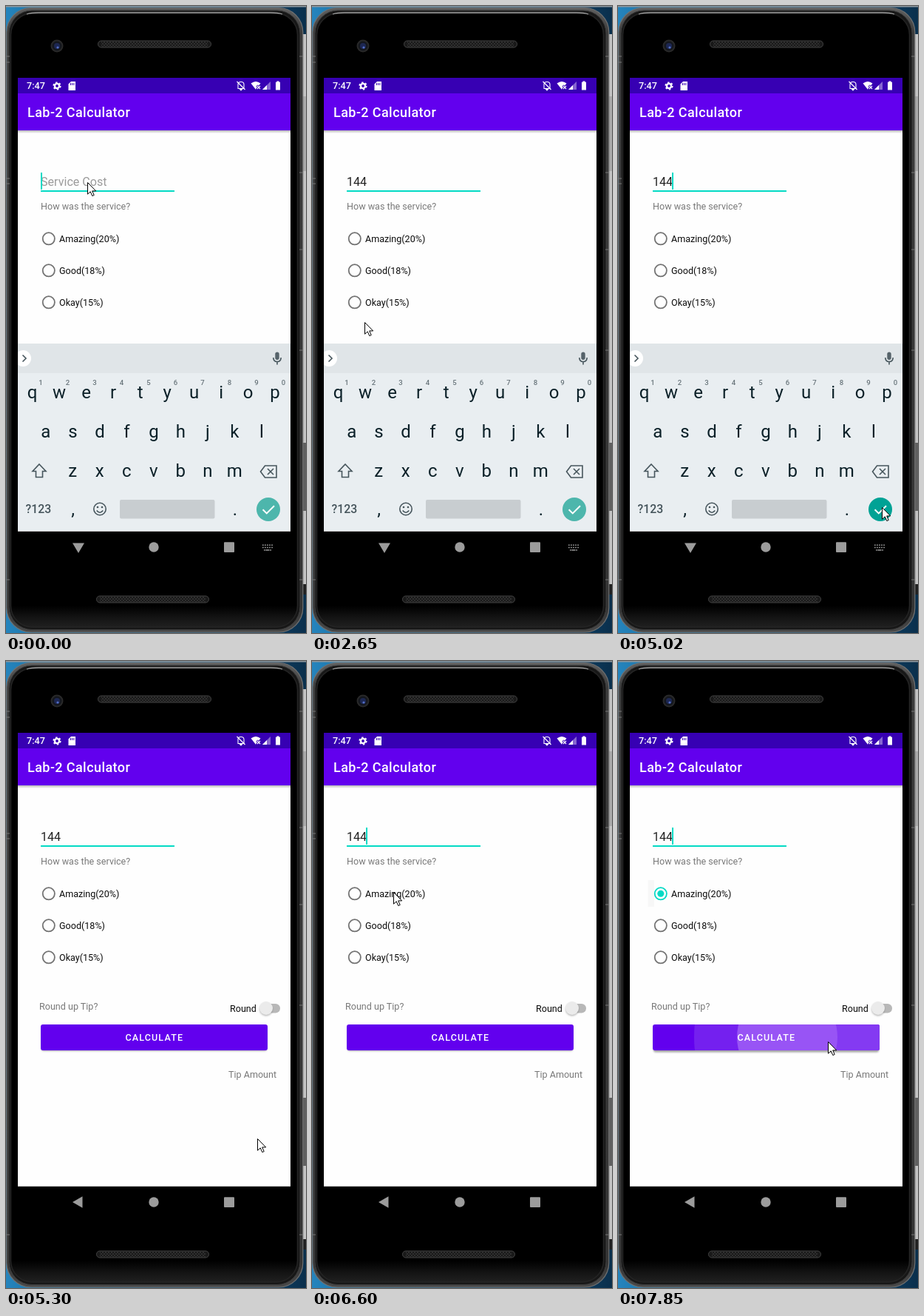
Recreate the animation shown at these times as an HTML page. Size 406 px wide and 847 px high, loop 8 s.

```html
<!DOCTYPE html>
<html lang="en">
<head>
<meta charset="utf-8">
<title>Tip calculator</title>
<style>
html, body { margin: 0; width: 100%; height: 100%; overflow: hidden; background: #000; }
svg { display: block; width: 406px; height: 847px; font-family: Roboto, sans-serif; }
.label { font-size: 12.57px; fill: #0c0c0c; }
.muted { fill: #797979; }
.key { font-size: 24px; fill: #0b2028; text-anchor: middle; }
.num { font-size: 9.6px; fill: #69757b; text-anchor: middle; font-weight: 500; }
.line { fill: none; stroke: #46555c; stroke-width: 1.6; }
</style>
</head>
<body>
<svg id="stage" viewBox="0 0 406 847">
  <defs>
    <linearGradient id="sky">
      <stop offset="0" stop-color="#2584bd"/><stop offset=".1" stop-color="#1d76ab"/>
      <stop offset=".9" stop-color="#0d3c5f"/><stop offset="1" stop-color="#0a2f4c"/>
    </linearGradient>
    <linearGradient id="metal" x2="0" y2="1">
      <stop offset="0" stop-color="#606060"/><stop offset=".04" stop-color="#3c3c3c"/>
      <stop offset=".96" stop-color="#343434"/><stop offset="1" stop-color="#4a4a4a"/>
    </linearGradient>
    <linearGradient id="face" x2="0" y2="1">
      <stop offset=".965" stop-color="#000"/><stop offset=".985" stop-color="#141414"/><stop offset="1" stop-color="#202020"/>
    </linearGradient>
    <linearGradient id="fade" x2="0" y2="1">
      <stop offset="0" stop-color="#000" stop-opacity=".28"/><stop offset="1" stop-color="#000" stop-opacity="0"/>
    </linearGradient>
    <pattern id="mesh" width="4" height="4" patternUnits="userSpaceOnUse">
      <path d="M0 1H2M2 3H4" stroke="#454545"/>
    </pattern>
    <filter id="soft" x="-20%" y="-40%" width="140%" height="200%"><feGaussianBlur stdDeviation="1.3"/></filter>
    <clipPath id="buttonClip"><rect x="47" y="491" width="307" height="35" rx="3"/></clipPath>
    <clipPath id="screenClip"><rect x="16" y="97" width="369" height="613"/></clipPath>
  </defs>

  <!-- desktop and phone body -->
  <rect width="406" height="847" fill="url(#sky)"/>
  <rect width="406" height="1.5" fill="#8d969c"/>
  <rect x="401" y="38" width="5" height="743" fill="#c4c4c4"/>
  <path d="M401 122H406V223H401Z" fill="#aaa"/>
  <path d="M401 590H406V682H401Z" fill="#606060"/>
  <path d="M401 781H406V795H401Z" fill="#202020"/>
  <rect x=".8" y="2.5" width="401" height="843.5" rx="33" fill="url(#metal)" stroke="#717171" stroke-width="1.2"/>
  <rect x="4" y="6" width="394" height="836.5" rx="31" fill="#171717" stroke="#3d3d3d"/>
  <rect x="6.5" y="10" width="388" height="829" rx="29" fill="url(#face)" stroke="#242424" stroke-width="1.5"/>
  <path d="M28 11Q34 9 44 9H358Q368 9 374 11" fill="none" stroke="#9b9b9b" stroke-width="1.3"/>
  <path d="M0 68H5M0 76H5M0 233H5M0 240H5M397 68H402M397 225H402M397 329H402M397 465H402M0 775H5M397 775H402" stroke="#777"/>
  <g stroke="#444"><rect x="124.5" y="47" width="153" height="9" rx="4.5" fill="#191919"/><rect x="122.5" y="797" width="152" height="9" rx="4.5" fill="#191919"/></g>
  <path d="M129 48H273V55H129ZM127 798H270V805H127Z" fill="url(#mesh)"/>
  <circle cx="69" cy="54" r="7.5" fill="#14171d" stroke="#292929" stroke-width="2"/>
  <circle cx="69" cy="54" r="4" fill="#1d2752"/><circle cx="70" cy="56" r="1.6" fill="#536fc7"/>

  <!-- application -->
  <g clip-path="url(#screenClip)">
    <rect x="16" y="97" width="369" height="613" fill="#fefefe"/>
    <rect x="16" y="168" width="369" height="4" fill="url(#fade)"/>
    <rect x="16" y="118" width="369" height="50" fill="#6200ee"/>
    <rect x="16" y="97" width="369" height="21" fill="#3700b3"/>
    <text x="28" y="112" font-size="12.6" font-weight="500" fill="#fff">7:47</text>
    <text x="29" y="150" font-size="18" font-weight="500" letter-spacing=".42" fill="#fff">Lab-2 Calculator</text>
    <g fill="#fff">
      <circle cx="69" cy="108" r="3.1" fill="none" stroke="#fff" stroke-width="2.4"/>
      <circle cx="69" cy="108" r="4.7" fill="none" stroke="#fff" stroke-width="1.8" stroke-dasharray="2.4 2.52"/>
      <path d="M88 102H94V114H84.5V105.5Z"/>
      <path d="M87.5 104V107M89.7 104V107M91.9 104V107" stroke="#3700b3" stroke-width="1"/>
      <path d="M314 111.5V106Q314 102.5 318 102.5T322 106V111.5ZM316.7 112.5H319.3L318 114Z" fill="none" stroke="#fff" stroke-width="1.1"/>
      <path d="M312.5 102L323.5 113" stroke="#fff" stroke-width="1.3"/>
      <path d="M331.5 104.5Q338 99.5 344.5 104.5L338 112.8Z"/>
      <path d="M339.5 107.5L344.5 112.5M344.5 107.5L339.5 112.5" stroke="#3700b3" stroke-width="3"/>
      <path d="M340 108L344 112M344 108L340 112" stroke="#fff" stroke-width="1.2"/>
      <path d="M358 102V113H347Z" fill-opacity=".4"/><path d="M353 107V113H347Z"/>
      <path d="M366.5 101.5H369.5V102.8H371V113.5H365V102.8H366.5Z"/>
    </g>

    <text id="hint" x="47" y="243" font-size="16.1" fill="#9b9b9b">Service Cost</text>
    <text id="cost" x="47" y="243" font-size="16.1" fill="#202020"></text>
    <rect x="47" y="249" width="181" height="2" fill="#03dac5"/>
    <rect id="caret" y="225" width="2" height="23" fill="#03dac5"/>
    <text class="label muted" x="47" y="274.5">How was the service?</text>
    <g id="radios"></g>

    <text class="label muted" x="45" y="470.5">Round up Tip?</text>
    <text class="label" x="303" y="474">Round</text>
    <rect x="346" y="463" width="25" height="12.5" rx="6.25" fill="#b8b8b8"/>
    <circle cx="352" cy="470.5" r="9" fill="#777" opacity=".5" filter="url(#soft)"/>
    <circle cx="352" cy="469" r="9" fill="#ebebeb"/>
    <rect id="shade" x="48" width="305" height="34" rx="3" fill="#666" filter="url(#soft)"/>
    <g clip-path="url(#buttonClip)">
      <rect x="47" y="490" width="307" height="37" fill="#6200ee"/>
      <circle id="outer" cx="284" cy="508" r="181" fill="#7420ef"/>
      <rect id="tail" x="229" y="490" width="126" height="37" fill="#843af2"/>
      <circle id="inner" cy="508" fill="#9854f5"/>
    </g>
    <text x="161.4" y="513" font-size="12.57" font-weight="500" letter-spacing="1.12" fill="#fff">CALCULATE</text>
    <text class="label muted" x="301" y="563">Tip Amount</text>

    <g id="keyboard">
      <rect x="16" y="456" width="369" height="254" fill="#e9eef1"/>
      <rect x="16" y="456" width="369" height="40" fill="#e0e5e8"/>
      <circle cx="23" cy="476" r="11" fill="#fff"/>
      <path class="line" d="M22.5 471.5L27 476L22.5 480.5" stroke-width="1.8"/>
      <rect x="364.3" y="467.5" width="5.4" height="10.5" rx="2.7" fill="#56636a"/>
      <path class="line" d="M361.8 475Q362 480.5 367 480.5T372.2 475M367 480.5V484.5"/>
      <g id="keys"></g>
      <path class="line" d="M45 619L54 628.5H49.5V636.5H40.5V628.5H36Z"/>
      <path class="line" d="M344.5 629L350.5 621H366V637H350.5ZM354 625L362 633M362 625L354 633"/>
      <text x="26.5" y="685" font-size="15.8" font-weight="500" fill="#46555c">?123</text>
      <circle class="line" cx="127" cy="679.5" r="8.2"/>
      <path class="line" d="M122.7 681.5Q127 687 131.3 681.5"/>
      <circle cx="124" cy="677" r="1.3" fill="#46555c"/><circle cx="130" cy="677" r="1.3" fill="#46555c"/>
      <rect x="154" y="667" width="128.5" height="25.5" rx="2" fill="#c8cdd0"/>
      <circle id="done" cx="355" cy="680" r="16"/>
      <path d="M347.6 680.2L352.8 685.4L363 675.2" fill="none" stroke="#fff" stroke-width="2"/>
    </g>
    <rect x="16" y="709" width="369" height="1" fill="#c4c4c4"/>
  </g>

  <!-- navigation -->
  <g fill="#9c9c9c">
    <path id="back"/>
    <circle cx="200" cy="731" r="6.7"/><rect x="295" y="724.3" width="14" height="13.7" rx="1"/>
    <g id="ime" fill="none" stroke="#9c9c9c" stroke-width="1.6">
      <path d="M347 728.3H361M347 731.5H361" stroke-dasharray="1.7 1.35"/>
      <path d="M349 735H359" stroke-dasharray="1.7 .6 5.2 .8"/>
    </g>
  </g>
  <path id="mouse" d="M.5 .5V16.2L4.2 12.8L6.8 18.6L9.2 17.5L6.7 11.9H11.7Z" fill="#fff" stroke="#000"/>
</svg>
<script>
const $ = id => document.getElementById(id);
const LOOP = 8000;

function add(parent, tag, attrs, text = '') {
  const el = document.createElementNS('http://www.w3.org/2000/svg', tag);
  for (const name in attrs) el.setAttribute(name, attrs[name]);
  el.textContent = text;
  return parent.appendChild(el);
}

function set(id, attrs) {
  for (const name in attrs) $(id).setAttribute(name, attrs[name]);
}

const show = (id, on) => set(id, { visibility: on ? 'visible' : 'hidden' });

// Keyboard letters
[['qwertyuiop', 35.6, 530], ['asdfghjkl', 53.9, 583], ['zxcvbnm', 90.3, 636]].forEach(([row, x, y], r) => {
  [...row].forEach((ch, i) => {
    const cx = x + i * 36.5;
    add($('keys'), 'text', { class: 'key', x: cx, y }, ch);
    if (!r) add($('keys'), 'text', { class: 'num', x: cx + 11.3, y: 512 }, (i + 1) % 10);
  });
});
add($('keys'), 'text', { class: 'key', x: 90.5, y: 688 }, ',');
add($('keys'), 'text', { class: 'key', x: 310, y: 688 }, '.');

// Radio group
const radios = $('radios');
add(radios, 'circle', { id: 'halo', cx: 58, cy: 314, r: 17, fill: '#e6e6e6' });
add(radios, 'rect', { id: 'trace', x: 40.5, y: 296, width: 8.5, height: 36, fill: '#f7f7f7' });
['Amazing(20%)', 'Good(18%)', 'Okay(15%)'].forEach((text, i) => {
  const y = 314.3 + i * 43;
  add(radios, 'circle', { id: 'ring' + i, cx: 57.8, cy: y, r: 8.1, fill: 'none', stroke: '#737373', 'stroke-width': 1.8 });
  add(radios, 'text', { class: 'label', x: 72, y: y + 4.7 }, text);
});
add(radios, 'circle', { id: 'dot', cx: 57.8, cy: 314.3, r: 4.5, fill: '#03dac5' });

// Step tables: [start, value...]
const typed = [[0, ''], [1480, '1'], [1640, '14'], [1820, '144']];
const blink = [280, 870, 1300, 1480, 2250, 2920, 3320, 3740, 4210, 4740, 5300, 5740, 6180, 6600, 7150, 7580];
const path = [
  [0, 110, 238], [2500, 98, 290], [2650, 71, 427], [2770, 56, 610], [2920, 48, 753],
  [3450, 26, 746], [3600, 9, 730], [3740, -40, 730],
  [4210, 367, 637], [4360, 372, 650], [4500, 366, 664], [4640, 359, 675], [4740, 357, 677],
  [5300, 340, 645], [5450, 307, 592], [5590, 224, 458], [5740, 146, 350], [5890, 116, 319],
  [6030, 111, 313], [6440, 110, 312],
  [7010, 132, 345], [7150, 193, 430], [7290, 256, 493], [7430, 284, 514]
];

const at = (table, t) => table.filter(row => row[0] <= t).pop();

function draw(t) {
  const text = at(typed, t)[1];
  const open = t < 5300;
  $('cost').textContent = text;
  show('hint', !text);
  set('caret', { x: text ? 46 + text.length * 9 : 47 });
  show('caret', blink.filter(b => b <= t).length % 2 === 0);

  show('keyboard', open);
  show('ime', open);
  set('done', { fill: t < 4880 || !open ? '#4db6ac' : t < 5020 ? '#27aca1' : '#00a295' });
  set('back', { d: open ? 'M90 725.5H106L98 739Z' : 'M103.5 723.3V738.8L90 731Z' });

  const chosen = t >= 6880;
  show('halo', t >= 6740 && t < 7150);
  show('trace', t >= 7150);
  show('dot', chosen);
  set('ring0', { stroke: chosen ? '#03dac5' : '#737373' });

  const pressed = t >= 7580, wide = t >= 7850;
  set('shade', { y: pressed ? 494.5 : 493, opacity: pressed ? .6 : .5 });
  show('outer', t >= 7720);
  show('tail', wide);
  show('inner', pressed);
  set('inner', { cx: wide ? 229 : t >= 7720 ? 257 : 278, r: wide ? 68 : t >= 7720 ? 42 : 22 });

  const [, x, y] = at(path, t);
  set('mouse', { transform: `translate(${x} ${y})` });
}

const start = performance.now();
function tick() {
  draw((performance.now() - start) % LOOP);
  requestAnimationFrame(tick);
}
draw(0);
requestAnimationFrame(tick);
</script>
</body>
</html>
```
